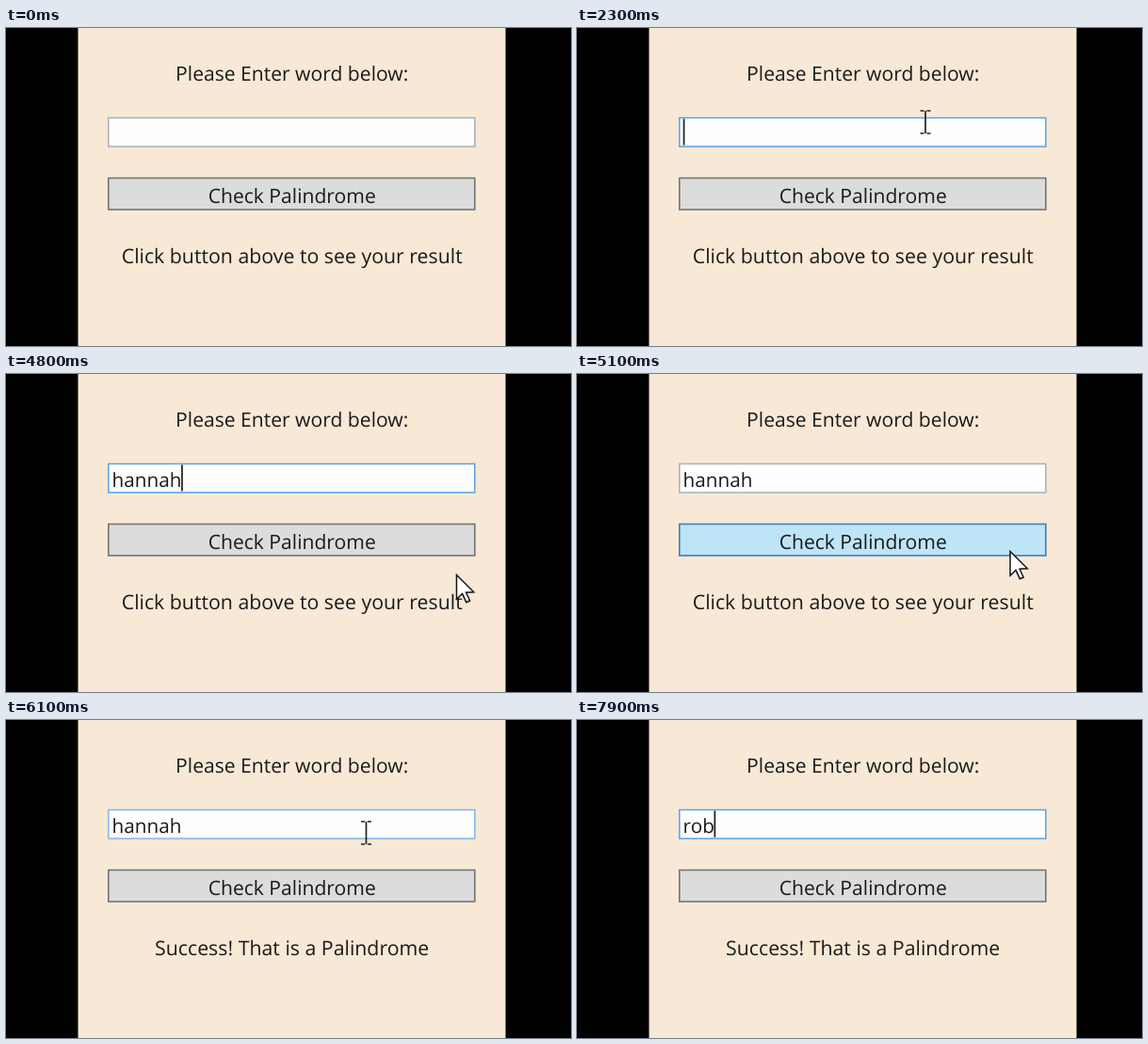
Write an HTML page with a canvas that moves like this. It is 600 by 338 pixels and loops after 8 s.

```html
<!DOCTYPE html>
<html lang="en">
<head>
<meta charset="utf-8">
<title>Palindrome checker</title>
<style>
  html, body { margin: 0; width: 100%; height: 100%; overflow: hidden; background: #000; }
  canvas { display: block; }
</style>
</head>
<body>
<canvas id="stage" width="600" height="338"></canvas>
<script>
const ctx = document.getElementById('stage').getContext('2d');
const LOOP = 8000, STEP = 100;
const INK = '#1b1b1b', CENTER = 303.7, TEXT_X = 112.6;

// Each track lists [start time, value]; a value holds until the next entry.
const typed = [
  [0, ''], [2700, 'h'], [2900, 'ha'], [3100, 'han'], [3200, 'hann'], [3400, 'hanna'],
  [3600, 'hannah'], [7200, ''], [7600, 'r'], [7700, 'ro'], [7900, 'rob']
];
const caret = [
  [0, false], [1200, true], [1700, false], [2200, true], [4200, false],
  [4700, true], [5000, false], [6300, true], [6400, false], [7200, true]
];
const fieldState = [
  [0, 'idle'], [1000, 'hover'], [1200, 'focus'], [5000, 'idle'], [5500, 'hover'], [6300, 'focus']
];
const buttonState = [
  [0, 'idle'], [700, 'hover'], [900, 'idle'], [5000, 'hover'], [5400, 'idle']
];
const selected = [[0, false], [6400, true], [7200, false]];
const message = [
  [0, 'Click button above to see your result'], [5200, 'Success! That is a Palindrome']
];
const pointer = [
  [0, null],
  [600, ['arrow', 400, 219]], [700, ['arrow', 392, 190]], [800, ['arrow', 386, 165]],
  [900, ['arrow', 382, 140]], [1000, ['beam', 378, 112]], [1200, null],
  [1300, ['beam', 372, 102]], [1400, ['beam', 370, 100]], [2700, null],
  [4200, ['arrow', 492, 216]], [4300, ['arrow', 499, 224]], [4400, ['arrow', 503, 230]],
  [4500, ['arrow', 504, 232]], [4700, ['arrow', 492, 222]], [4800, ['arrow', 478.5, 213.5]],
  [4900, ['arrow', 466, 198]], [5000, ['arrow', 460, 188.5]],
  [5300, ['arrow', 440, 172]], [5400, ['arrow', 412, 142]], [5500, ['beam', 390, 119]],
  [6100, ['beam', 382.5, 120]], [6200, ['beam', 356, 116]], [6300, ['beam', 336, 113]],
  [7600, null]
];

const fieldBorder = { idle: '#abb3ba', hover: '#86b9e8', focus: '#62a5e2' };
const buttonLook = { idle: ['#dcdcdc', '#747474'], hover: ['#bee4f8', '#3f7fae'] };

const at = (track, t) => track.findLast(([start]) => start <= t)[1];

function label(text, x, y, size, align = 'center') {
  ctx.font = `${size}px "Open Sans", "Noto Sans", sans-serif`;
  ctx.textAlign = align;
  ctx.fillStyle = INK;
  ctx.fillText(text, x, y);
}

function box(y, height, fill, border) {
  ctx.fillStyle = fill;
  ctx.strokeStyle = border;
  ctx.lineWidth = 1.6;
  ctx.fillRect(108.8, y, 389, height);
  ctx.strokeRect(108.8, y, 389, height);
}

function drawField(t) {
  const text = at(typed, t);
  box(95.5, 30.5, '#fefefe', fieldBorder[at(fieldState, t)]);
  label(text, TEXT_X, 120, 20.7, 'left');
  const end = TEXT_X + ctx.measureText(text).width;
  if (at(selected, t)) {
    ctx.fillStyle = 'rgba(0, 120, 215, 0.4)';
    ctx.fillRect(113, 97, end - 113, 27.5);
  }
  if (at(caret, t)) {
    ctx.fillStyle = INK;
    ctx.fillRect(Math.max(end, 113) - 0.3, 96.5, 1.7, 28);
  }
}

function arrow(x, y) {
  const outline = [[0, 0], [0, 17], [4, 13.2], [6.8, 19.2], [9.3, 18.1], [6.6, 12.3], [12, 12]];
  const scale = 1.52;
  ctx.beginPath();
  for (const [dx, dy] of outline) ctx.lineTo(x + dx * scale, y + dy * scale);
  ctx.closePath();
  ctx.fillStyle = '#fff';
  ctx.fill();
  ctx.strokeStyle = '#151515';
  ctx.lineWidth = 1.5;
  ctx.stroke();
}

function beam(x, y) {
  ctx.beginPath();
  ctx.moveTo(x, y - 12);
  ctx.lineTo(x, y + 12);
  for (const side of [-12, 12]) {
    ctx.moveTo(x - 5.5, y + side);
    ctx.lineTo(x - 1.5, y + side);
    ctx.moveTo(x + 1.5, y + side);
    ctx.lineTo(x + 5.5, y + side);
  }
  ctx.strokeStyle = '#222';
  ctx.lineWidth = 1.7;
  ctx.stroke();
}

function draw(t) {
  ctx.fillStyle = '#000';
  ctx.fillRect(0, 0, 600, 338);
  ctx.fillStyle = '#f7e9d6';
  ctx.fillRect(76.5, 0, 454, 338);

  label('Please Enter word below:', CENTER, 56, 21.1);
  drawField(t);
  box(159.5, 33.5, ...buttonLook[at(buttonState, t)]);
  label('Check Palindrome', CENTER, 186, 21.1);
  label(at(message, t), CENTER, 250, 21.3);

  const cursor = at(pointer, t);
  if (cursor) {
    const [kind, x, y] = cursor;
    (kind === 'arrow' ? arrow : beam)(x, y);
  }
}

function tick() {
  const t = performance.now() % LOOP;
  draw(Math.floor(t / STEP) * STEP);
  requestAnimationFrame(tick);
}

ctx.textRendering = 'geometricPrecision';
tick();
</script>
</body>
</html>
```
